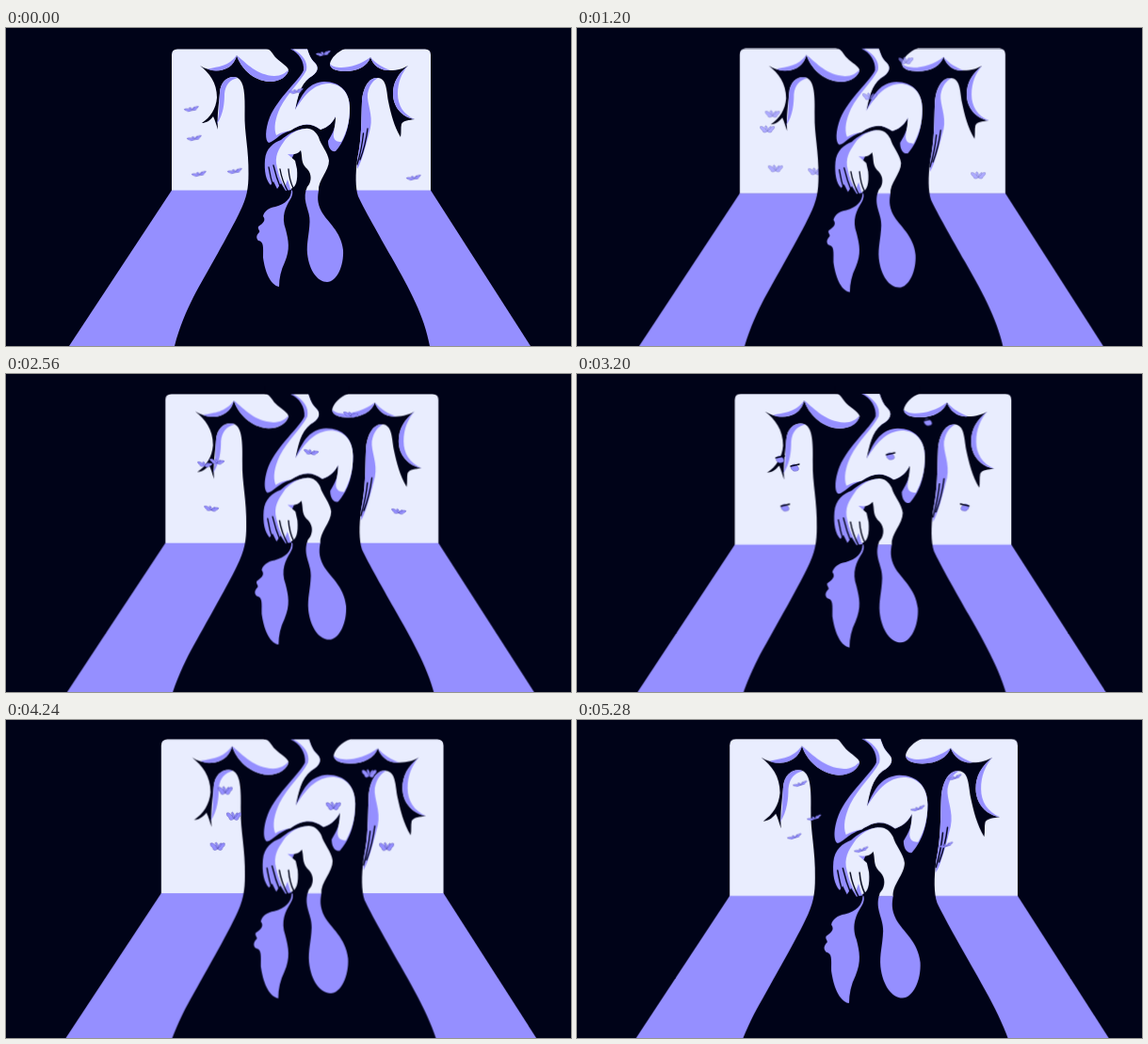
Animation, 600 px wide and 338 px high, one loop 5.36 s. Source, as an HTML page without scripts:

```html
<!DOCTYPE html>
<html lang="en">
<head>
<meta charset="utf-8">
<title>Window and tree</title>
<style>
  :root { --ink: #000318; --pale: #e9edfe; --violet: #958fff; --loop: 5360ms; }
  html, body { margin: 0; width: 100%; height: 100%; overflow: hidden; background: var(--ink); }
  svg { display: block; width: 100vw; height: 100vh; }

  .ink { fill: var(--ink); }
  .pale { fill: var(--pale); }
  .violet { fill: var(--violet); }
  .crease { fill: none; stroke: var(--ink); stroke-width: 1.3; stroke-linecap: round; }
  .vein { stroke: #5652b4; stroke-width: .5; }

  /* slow push-in shared by every scenery layer */
  .zoom { transform-origin: 300px 43px; animation: zoom var(--loop) steps(67) infinite; }
  @keyframes zoom { to { transform: scale(1.1137); } }

  /* each moth carries its own way points a..g */
  .moth { animation: drift var(--loop) linear infinite; }
  @keyframes drift {
    0% { transform: translate(var(--a)); }
    14.93% { transform: translate(var(--b)); }
    31.34% { transform: translate(var(--c)); }
    47.76% { transform: translate(var(--d)); }
    70.15% { transform: translate(var(--e)); }
    86.57% { transform: translate(var(--f)); }
    98.51%, 100% { transform: translate(var(--g)); }
  }
  .late { animation: late var(--loop) step-end infinite; }
  @keyframes late { 0% { opacity: 0; } 80% { opacity: 1; } }

  /* eleven wing beats per loop */
  .open { animation: flap calc(var(--loop) / 11) linear infinite; }
  .shut { animation: fold calc(var(--loop) / 11) step-end infinite; }
  @keyframes flap {
    0% { transform: rotate(-12deg) scaleY(.5); }
    25% { transform: rotate(8deg) scaleY(.6); }
    45% { transform: scaleY(.85); opacity: 1; }
    50%, 66% { transform: scaleY(.9); opacity: 0; }
    68%, 74% { transform: none; opacity: 1; }
    83% { transform: rotate(-18deg) scaleY(.4); }
    100% { transform: rotate(-12deg) scaleY(.5); }
  }
  @keyframes fold { 0% { opacity: 0; } 48% { opacity: 1; } 67% { opacity: 0; } }
</style>
</head>
<body>
<svg viewBox="0 0 600 338" preserveAspectRatio="none">
  <defs>
    <g id="open">
      <path class="violet vein" d="M0 3C-2-1-5-4-7.500-3C-8 0-6 1-5 2C-5 5-2 5 0 3C2 5 5 5 5 2C6 1 8 0 7.500-3C5-4 2-1 0 3Z"/>
      <path class="violet vein" d="M0 3C-2 0-3-3-2-4C0-4 1 0 0 3C1-1 3-4 4-3C4-1 2 1 0 3Z"/>
    </g>
    <g id="shut">
      <path class="violet vein" d="M-4-1C-1-4 2-3 3-1C5 1 5 4 2 4C-1 5-4 3-4-1Z"/>
      <path class="crease" d="M-4-1L5-3"/>
    </g>
  </defs>

  <!-- window and light on the floor -->
  <g class="zoom">
    <path class="pale" d="M176 173V28.500Q176 22.500 182 22.500H445Q451 22.500 451 28.500V173Z"/>
    <path class="violet" d="M176 172.500L67 338H557L451 172.500Z"/>
  </g>

  <g class="moth" style="--a:243px,152px;--b:250px,149px;--c:257px,156px;--d:266px,153px;--e:281px,150px;--f:293px,144px;--g:302px,138px"><g class="open"><use href="#open"/></g><g class="shut"><use href="#shut"/></g></g>

  <g class="zoom">
    <!-- tree -->
    <path class="ink" d="M174 350L179 338C184 318 192 300 199 286C212 262 238 217 248 196C256 180 257.500 170 257.500 155
      C258 130 253 110 253.500 92C254 70 253 57 246 53C239 50 228 54 227 69C226 82 224 92 225 108
      C223 102 222 98 220 94C216 99 212 101 208 101C217 95 223 86 224 74C224 58 216 48 206 40
      C212 44 220 46 228 45C238 43 243 37 245 29C249 42 262 56 280 57C292 57 299 50 300 45
      C300 41 292 37 287 32C283 28 281 22 276 22V15H360V22C352 25 345 32 344 38C344 44 352 46 360 46
      C374 46 384 40 387 31C390 40 398 46 408 45C416 45 422 43 427 40C416 49 411 58 411 70
      C411 84 421 95 434 97C428 98 422 98 420 102C419 106 420 111 419 116C412 104 409 92 406 78
      C404 65 404 54 395 53C385 52 379 64 378 78C377 100 378 115 373 140C371 155 371 170 374 179
      C380 192 396 220 409 243C430 280 444 306 450 338L454 350Z"/>

    <!-- shading along the branches -->
    <g class="violet">
      <path d="M245 29C256 38 266 50 285 51C292 51 297 48 300 44C299 51 292 57 280 57C262 56 249 42 245 29Z"/>
      <path d="M214 43.500C226 41 236 41 245 29C243 37 238 43 228 45C221 46 217 45 214 43.500Z"/>
      <path d="M246 53C239 50 228 54 227 69C226 82 227 92 224 102C231 92 232 79 232 70C233 60 238 55 246 53Z"/>
      <path d="M344 38C349 45 372 43 387 31C384 40 374 46 360 46C352 46 344 44 344 38Z"/>
      <path d="M387 31C390 40 398 46 408 45C400 42 393 38 387 31Z"/>
      <path d="M427 40C416 49 411 58 411 70C411 84 421 95 434 97C422 92 416 82 416 70C416 58 420 48 427 40Z"/>
      <path d="M395 53C385 52 379 64 378 78C377 100 378 115 373 140V150C378 142 383 122 387 106
        C390 92 383 80 384 70C386 60 390 56 395 53Z"/>
    </g>
    <path class="crease" d="M384 107Q382 124 376 140M379.500 112Q378 128 373 145"/>

    <!-- bent body -->
    <path class="violet" d="M302 22.500C311 26 317 36 316 45C311 56 289 74 280 95C275 108 275 120 279 122
      C285 121 289 113 302 109C314 101 323 100 334 108C343 105 347 100 350 94C351 104 347 112 342 120
      C342 128 346 132 350 131C358 122 365 108 365 85C365 68 355 57 338 57C322 58 315 68 307 87
      C309 74 312 61 322 53C331 48 333 42 328 37C323 32 322 28 320 22.500Z"/>
    <path class="pale" d="M305 22.500C315 28 321 36 319 45C313 57 299 69 291 85C286 96 284 106 287 114
      C292 111 297 110 302 109C314 101 323 100 334 108C343 105 347 100 350 94C350 104 347 112 348 116
      C349 120 352 121 356 121C362 110 365 100 365 85C365 68 355 59 342 59C328 60 319 68 307 87
      C310 74 312 61 322 53C331 48 333 42 328 37C323 32 322 28 320 22.500Z"/>

    <!-- head and fingers -->
    <path class="violet" d="M318 107C306 108 298 114 292 119C284 122 276 128 275 140C274 152 276 162 281 167
      L284 163L288 171L292 165L297 173L303 172V140Z"/>
    <path class="pale" d="M318 107C308 108 302 113 297 118C291 127 286 133 287 144C289 155 292 163 296 169L299 161
      L302 171C308 170 310 162 309 150L307 141L299 134C306 135 310 134 313 130C315 137 313 142 318 148
      C324 153 325 160 322 166Q319 169 318.500 173H332C331 162 343 152 343 141C342 132 334 124 332 116
      C329 110 324 106 318 107Z"/>
    <path class="crease" d="M279 148Q281 160 284 169M284 146Q287 159 292 171M291 150Q293 162 299 173M300 150Q301 162 305 170"/>

    <!-- face and oval on the floor -->
    <path class="violet" d="M303 172.500C303 181 297 187 286 190C279 191 274 195 273 200C276 204 274 207 268 211
      C267 214 270 215 269 217C265 221 266 224 268 226C274 227 273 233 273 244C275 258 280 273 290 275
      C290 266 292 257 296 249C302 235 300 226 297 214C292 200 297 190 302 182Q305 177 304 172.500Z"/>
    <path class="violet" d="M318.500 172.500C315 186 323 194 322.500 206C322 220 319 228 320 240C322 258 331 270 341 270
      C351 270 359 253 358 236C356 216 341 206 335 195C330 185 331 179 332 172.500Z"/>
  </g>

  <!-- moths in front -->
  <g class="moth" style="--a:197px,86px;--b:203px,87px;--c:213px,96px;--d:224px,93px;--e:237px,104px;--f:246px,100px;--g:252px,104px"><g class="open"><use href="#open"/></g><g class="shut"><use href="#shut"/></g></g>
  <g class="moth" style="--a:200px,117px;--b:198px,110px;--c:207px,104px;--d:211px,96px;--e:219px,85px;--f:244px,66px;--g:237px,68px"><g class="open"><use href="#open"/></g><g class="shut"><use href="#shut"/></g></g>
  <g class="moth" style="--a:205px,155px;--b:208px,150px;--c:214px,148px;--d:218px,143px;--e:223px,140px;--f:226px,129px;--g:231px,124px"><g class="open"><use href="#open"/></g><g class="shut"><use href="#shut"/></g></g>
  <g class="moth" style="--a:433px,159px;--b:427px,160px;--c:425px,152px;--d:417px,146px;--e:408px,137px;--f:401px,132px;--g:392px,133px"><g class="open"><use href="#open"/></g><g class="shut"><use href="#shut" transform="scale(-1 1)"/></g></g>
  <g class="moth" style="--a:337px,27px;--b:346px,29px;--c:353px,41px;--d:366px,43px;--e:378px,57px;--f:392px,56px;--g:401px,61px"><g class="open"><use href="#open"/></g><g class="shut"><use href="#shut"/></g></g>
  <g class="moth" style="--a:308px,67px;--b:310px,68px;--c:312px,78px;--d:324px,83px;--e:340px,90px;--f:354px,92px;--g:362px,94px"><g class="open"><use href="#open"/></g><g class="shut"><use href="#shut"/></g></g>
  <g class="late"><g class="moth" style="--a:243px,152px;--b:250px,149px;--c:257px,156px;--d:266px,153px;--e:281px,150px;--f:293px,144px;--g:302px,138px"><g class="open"><use href="#open"/></g><g class="shut"><use href="#shut"/></g></g></g>
</svg>
</body>
</html>
```
